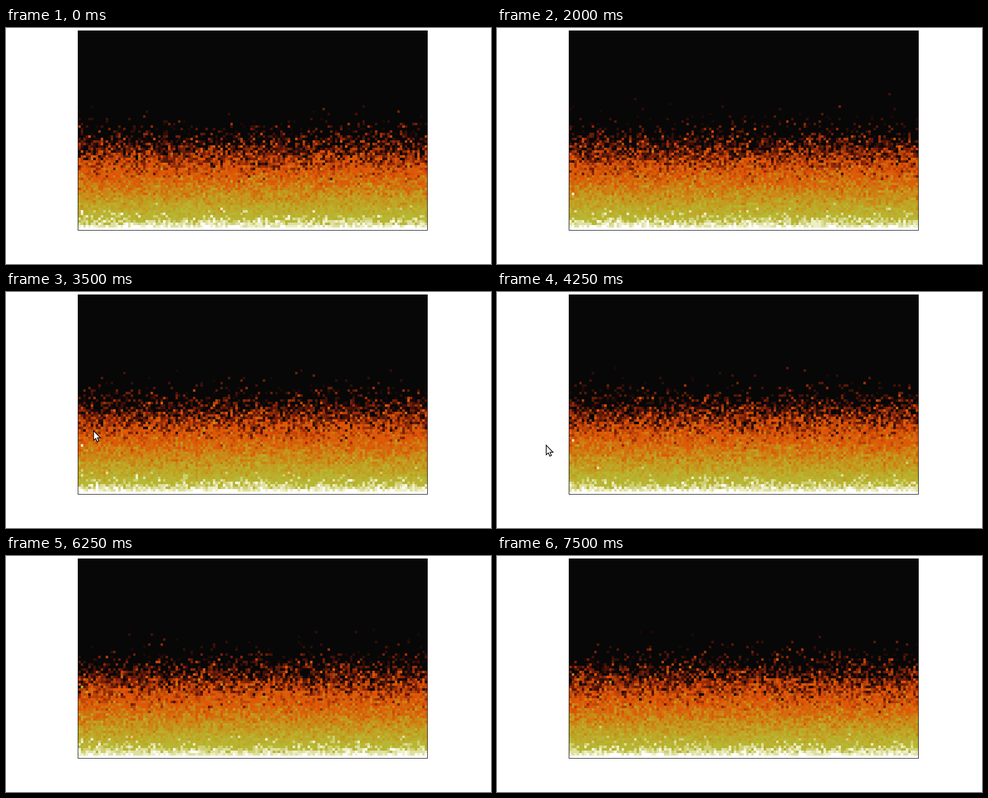
Animation, 973 px wide and 473 px high, one loop 8000 ms. Source, as an HTML page with a canvas:

```html
<!DOCTYPE html>
<html lang="en">
<head>
<meta charset="utf-8">
<title>Pixel fire</title>
<style>
  html, body { margin: 0; width: 100%; height: 100%; overflow: hidden; background: #fff; }
  #fire { position: absolute; left: 144px; top: 5px; border: 1px solid #000; border-top: 0; background: #070707; }
  #pointer { position: absolute; left: 0; top: 0; overflow: visible; visibility: hidden; }
</style>
</head>
<body>
<canvas id="fire" width="700" height="400"></canvas>
<svg id="pointer" width="16" height="25">
  <path d="M.7 1V20.2L5 16.4L8 23L11.2 21.6L8.4 15.2H14.4Z" fill="#fff" stroke="#000" stroke-width="1.5"/>
</svg>
<script>
const COLS = 140, ROWS = 80, CELL = 5, TICK = 250, LOOP = 8000;
const HOLDS = [6, 11, 16, 24, 31]; // ticks on which the fire stands still
const PALETTE = `070707 1f0707 2f0f07 470f07 571707 671f07 771f07 8f2707 9f2f07 af3f07
  bf4707 c74707 df4f07 df5707 df5707 d75f07 d75f07 d7670f cf6f0f cf770f cf7f0f cf8717
  c78717 c78f17 c7971f bf9f1f bf9f1f bfa727 bfa727 bfaf2f b7af2f b7b72f b7b737 cfcf6f
  dfdf9f efefc7 ffffff`.split(/\s+/).map(c => '#' + c);
const HOTTEST = PALETTE.length - 1;

// Pointer: first tick and its tip position on each moving step
const POINTER_START = 12;
const POINTER_PATH = [[198, 267], [188, 271], [175, 277], [150, 288], [98, 306], [9, 338]];

const ctx = document.getElementById('fire').getContext('2d');
const pointer = document.getElementById('pointer');

let seed = 20231;
function random() {
  seed = (seed + 0x6d2b79f5) | 0;
  let t = Math.imul(seed ^ (seed >>> 15), seed | 1);
  t ^= t + Math.imul(t ^ (t >>> 7), t | 61);
  return ((t ^ (t >>> 14)) >>> 0) / 4294967296;
}

// Each cell takes the heat of the cell below, less a random decay
function spread(heat) {
  const next = heat.slice();
  for (let i = 0; i < COLS * (ROWS - 1); i++) {
    const below = heat[i + COLS];
    next[i] = below ? Math.max(0, below - Math.floor(random() * 3)) : 0;
  }
  return next;
}

const stepAt = tick => tick - HOLDS.filter(h => h <= tick).length;

let heat = new Uint8Array(COLS * ROWS).fill(HOTTEST, COLS * (ROWS - 1));
for (let i = 0; i < ROWS; i++) heat = spread(heat);
const steps = [heat];
while (steps.length <= stepAt(LOOP / TICK - 1)) steps.push(spread(steps[steps.length - 1]));

function drawFire(grid) {
  ctx.fillStyle = PALETTE[0];
  ctx.fillRect(0, 0, COLS * CELL, ROWS * CELL);
  grid.forEach((h, i) => {
    if (!h) return;
    ctx.fillStyle = PALETTE[h];
    ctx.fillRect(i % COLS * CELL, Math.floor(i / COLS) * CELL, CELL, CELL);
  });
}

function drawPointer(step) {
  const tip = POINTER_PATH[step - stepAt(POINTER_START)];
  pointer.style.visibility = tip ? 'visible' : 'hidden';
  if (tip) pointer.style.transform = `translate(${tip[0]}px, ${tip[1]}px)`;
}

let shown = -1;
function render() {
  const step = stepAt(Math.floor(performance.now() % LOOP / TICK));
  if (step !== shown) {
    shown = step;
    drawFire(steps[step]);
    drawPointer(step);
  }
  requestAnimationFrame(render);
}
render();
</script>
</body>
</html>
```
